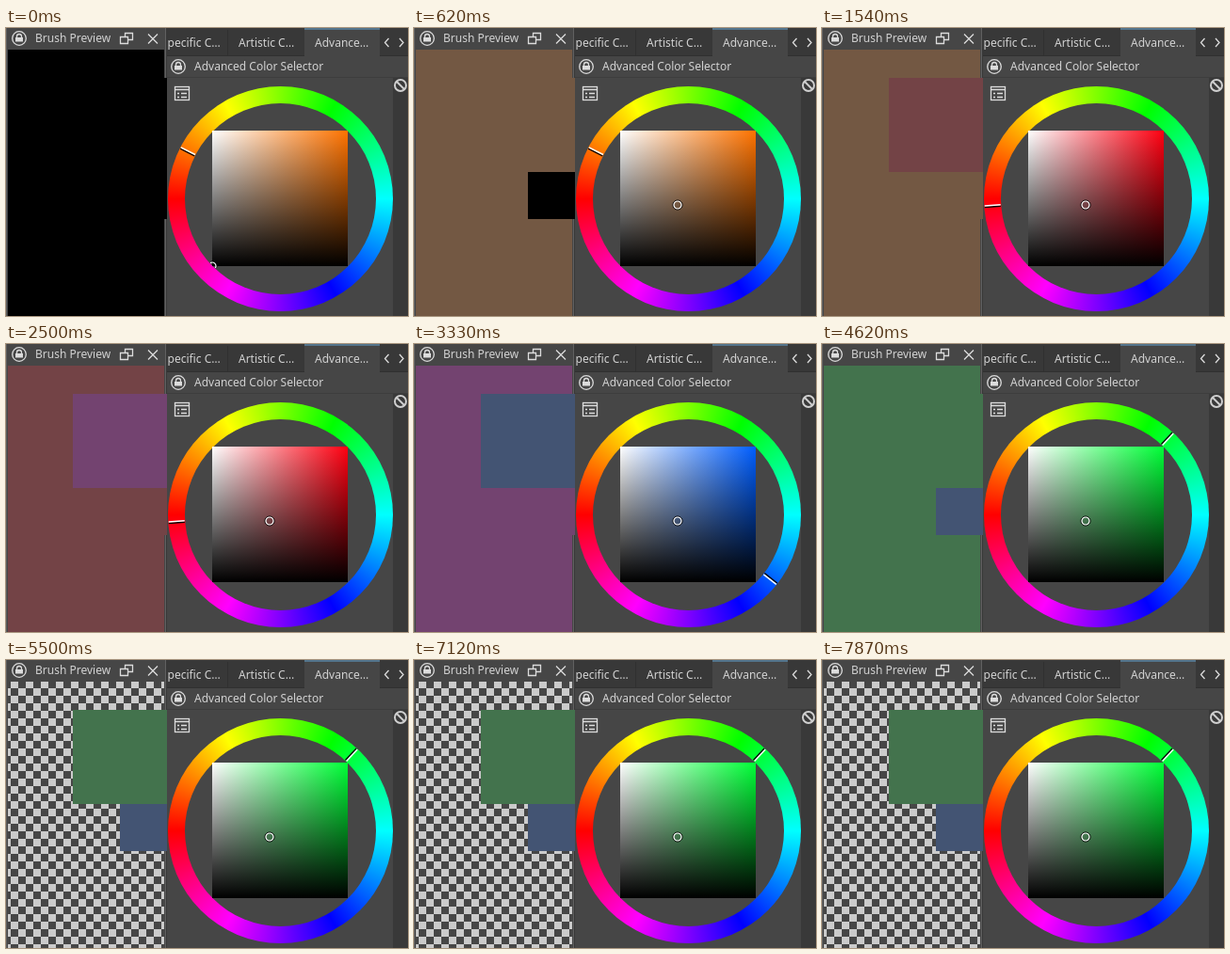
An HTML page for the animation above (8000 ms loop, 427 px wide and 306 px high).

```html
<!DOCTYPE html>
<html lang="en">
<head>
<meta charset="utf-8">
<title>Brush Preview</title>
<style>
html, body { margin: 0; width: 100%; height: 100%; overflow: hidden; background: #464646; }
#stage { position: relative; width: 427px; height: 306px; overflow: hidden; background: #464646; }
#stage > * { position: absolute; }
#ring {
  left: 172px; top: 62px; width: 239px; height: 239px; border-radius: 50%;
  background: conic-gradient(from 270deg, #f00, #ff0, #0f0, #0ff, #00f, #f0f, #f00);
}
#hole { left: 190px; top: 80px; width: 203px; height: 203px; border-radius: 50%; background: #464646; }
#shade { left: 219px; top: 109px; width: 144px; height: 144px; }
svg { left: 0; top: 0; display: block; }
text { font: 12px "Noto Sans", sans-serif; fill: #d2d2d2; }
.line { fill: none; stroke: #dcdcdc; stroke-width: 1.3; }
</style>
</head>
<body>
<div id="stage">
  <div id="ring"></div>
  <div id="hole"></div>
  <div id="shade"></div>
  <svg width="427" height="306" viewBox="0 0 427 306">
    <defs>
      <pattern id="checks" x="5" y="22" width="16" height="16" patternUnits="userSpaceOnUse">
        <rect width="16" height="16" fill="#464646"/>
        <path d="M0 0h8v8h-8zM8 8h8v8h-8z" fill="#cbcbcb"/>
      </pattern>
      <clipPath id="area"><rect x="217" y="107" width="148" height="148"/></clipPath>
      <g id="lock">
        <circle r="7.3" class="line"/>
        <rect x="-4" y="-1" width="8" height="4.5" fill="#dcdcdc"/>
        <path d="M-2.5 -1v-1a2.5 2.5 0 0 1 5 0v1" class="line"/>
      </g>
    </defs>

    <!-- tabs -->
    <rect x="171" width="256" height="30" fill="#383838"/>
    <path d="M235.5 2V30M171 29.5H317M397 29.5H427" stroke="#303030"/>
    <rect x="317" width="80" height="30" fill="#464646"/>
    <rect x="317" width="80" height="2" fill="#53748c"/>
    <text x="165" y="20">Specific C…</text>
    <text x="247" y="20">Artistic C…</text>
    <text x="328" y="20">Advance…</text>
    <path class="line" d="M406.500 11l-4 4.500 4 4.500M418 11l4 4.500-4 4.500"/>

    <!-- selector header and side strip -->
    <use href="#lock" x="183" y="41"/>
    <text x="200" y="45">Advanced Color Selector</text>
    <rect x="171" y="52" width="256" height="1" fill="#3d3d3d"/>
    <rect x="411" y="53" width="16" height="253" fill="#393939"/>
    <g fill="none" stroke="#cfcfcf" stroke-width="2">
      <circle cx="419" cy="61" r="6"/>
      <path d="M415 57l8 8"/>
    </g>
    <rect class="line" x="179.500" y="62.500" width="15" height="14"/>
    <path class="line" d="M179 65.500H195M182 69.500h2M186 69.500h6M182 73.500h2M186 73.500h6"/>

    <!-- hue marker and picker -->
    <g id="marker" stroke-width="1.5">
      <path d="M-119 .75H-102" stroke="#000"/>
      <path d="M-119 -.75H-102" stroke="#fff"/>
    </g>
    <g clip-path="url(#area)">
      <g id="picker" fill="none">
        <circle r="5" stroke="#000"/>
        <circle r="4" stroke="#fff" stroke-width="1.2"/>
      </g>
    </g>

    <!-- preview panel -->
    <rect width="171" height="306" fill="#464646"/>
    <path d="M.5 0V306M169.500 0V306" stroke="#606060"/>
    <path d="M170.500 0V306" stroke="#383838"/>
    <use href="#lock" x="14" y="11"/>
    <text x="31" y="15">Brush Preview</text>
    <path class="line" d="M126.500 9V5.500H134.500V12.500H130M121.500 9.500H129.500V16.500H121.500Z"/>
    <path class="line" d="M151 6.500l10 10M161 6.500l-10 10"/>
    <rect id="fill" x="2" y="23" width="166" height="283"/>
    <rect id="front" x="71" y="53" width="100" height="100"/>
    <rect id="back" x="121" y="153" width="50" height="50"/>
  </svg>
</div>
<script>
const LOOP = 8000;
const SAT = 0.42, VAL = 0.45;
const BLACK = -1, CLEAR = -2;
const ORANGE = 27, RED = 356, PURPLE = 304, BLUE = 218, GREEN = 133;

// Each track lists [start time, value].
const front = [[0, BLACK], [500, ORANGE], [1500, RED], [2500, PURPLE], [3330, BLUE], [4160, GREEN]];
const wheel = [[0, ORANGE], [1540, RED], [2540, PURPLE], [3330, BLUE], [4160, GREEN]];
const fill = [[0, BLACK], [620, ORANGE], [1620, RED], [2620, PURPLE], [3620, BLUE], [4620, GREEN],
  [5500, CLEAR], [6410, GREEN], [7120, CLEAR], [7540, GREEN], [7870, CLEAR]];

const el = id => document.getElementById(id);
const indexAt = (track, t) => track.filter(([start]) => start <= t).length - 1;
const valueAt = (track, t) => track[indexAt(track, t)][1];

function hsv(h, s, v) {
  const channel = n => {
    const k = (n + h / 60) % 6;
    return Math.round(255 * v * (1 - s * Math.max(0, Math.min(k, 4 - k, 1))));
  };
  return `rgb(${channel(5)},${channel(3)},${channel(1)})`;
}

function paint(value) {
  if (value === CLEAR) return "url(#checks)";
  return value === BLACK ? "#000" : hsv(value, SAT, VAL);
}

function draw(t) {
  const i = indexAt(front, t);
  el("front").setAttribute("fill", paint(front[i][1]));
  // The second swatch keeps the previous colour.
  el("back").setAttribute("fill", paint(front[Math.max(0, i - 1)][1]));
  el("fill").setAttribute("fill", paint(valueAt(fill, t)));

  const hue = valueAt(wheel, t);
  el("marker").setAttribute("transform", `translate(291.5 181.5) rotate(${hue})`);
  el("shade").style.background =
    `linear-gradient(transparent, #000), linear-gradient(to right, #fff, ${hsv(hue, 1, 1)})`;

  const [x, y] = t < 500 ? [219, 253] : [280, 188];
  el("picker").setAttribute("transform", `translate(${x} ${y})`);
}

const begin = performance.now();
function tick() {
  draw((performance.now() - begin) % LOOP);
  requestAnimationFrame(tick);
}
draw(0);
requestAnimationFrame(tick);
</script>
</body>
</html>
```
